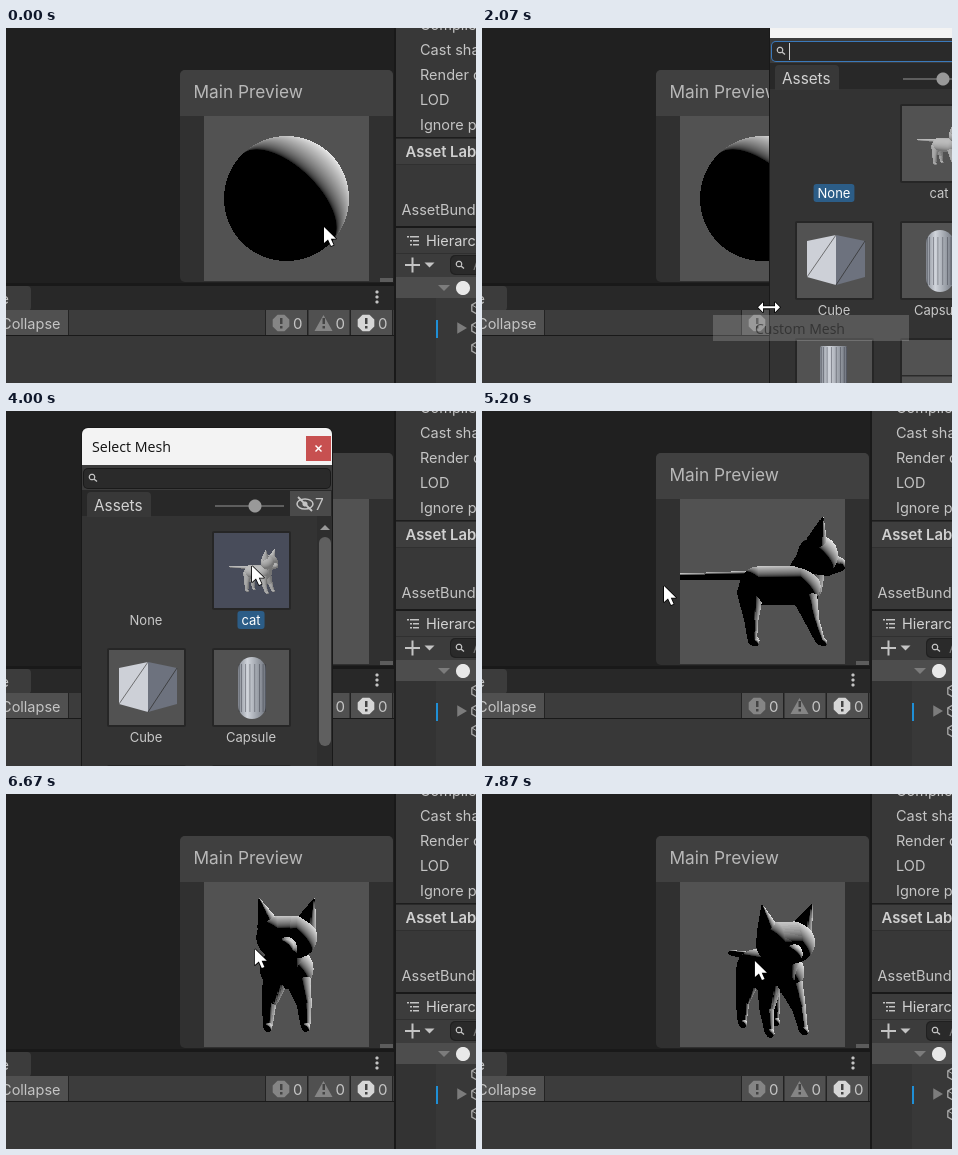
An HTML page with a canvas for the animation above (8 s loop, 470 by 355 pixels).

```html
<!DOCTYPE html>
<html lang="en">
<head>
<meta charset="utf-8">
<title>Preview mesh</title>
<style>
  html, body { margin: 0; height: 100%; overflow: hidden; background: #202020; }
  canvas { display: block; }
</style>
</head>
<body>
<canvas id="stage" width="470" height="355"></canvas>
<script>
const ctx = document.getElementById('stage').getContext('2d');
const LOOP = 8000, STEP = 1000 / 15;
const UI = 'Inter, sans-serif', SYSTEM = '"Open Sans", sans-serif';
const TEXT = '#c4c4c4', TOOLBAR = '#3c3c3c', LINE = '#232323', THUMB = '#525252';
const MENU = ['Sphere', 'Capsule', 'Cylinder', 'Cube', 'Quad', 'Sprite', 'Custom Mesh'];

// Moves: start, end, then where the values arrive.
const pointerAt = follow([318, 199], [
  [0, 470, 228, 128], [730, 1400, 288, 293], [1870, 2070, 287, 279], [2070, 2600, 390, 4],
  [3200, 3670, 178, 48], [3670, 3930, 246, 155], [4200, 4470, 290, 193],
  [4600, 5200, 182, 175], [5530, 6670, 249, 155], [6670, 7870, 273, 167]
]);
const dialogAt = follow([288, -27], [[3200, 3670, 76, 17]]);
const viewAt = follow([Math.PI, 0], [ // yaw, pitch
  [4600, 5200, Math.PI / 2, 0], [5530, 6670, 0, 0], [6670, 7400, 0.7, -0.06], [7400, 7870, 0.41, 0.1]
]);

function follow(start, moves) {
  return t => moves.reduce((from, [begin, end, ...to]) => {
    const f = Math.min(1, Math.max(0, (t - begin) / (end - begin)));
    return from.map((v, i) => v + (to[i] - v) * f);
  }, start);
}

// Meshes are chains of [x, y, z, radius]; z points towards the viewer.
const leg = (side, z, lean) => [
  [side * 10, -11, z, 13], [side * 17, -38, z + lean, 7],
  [side * 18, -58, z + lean * 2, 4.5], [side * 18, -60, z + lean * 2 + 3, 4]
];
const SPHERE = [[[0, 0, 0, 62.5], [0, 0, 0, 62.5]]];
const CAT = [
  [[0, 5, -83, 3], [0, 6, -18, 4.5]],
  [[0, -4, 40, 20], [0, 14, 46, 17]],
  [[-9, 26, 55, 20], [9, 26, 55, 20]],
  [[0, 18, 62, 13], [0, 17, 77, 7]],
  ...[-1, 1].flatMap(side => [
    [[side * 6, -4, -4, 19], [side * 6, -4, 38, 20]],
    [[side * 17, 36, 53, 11], [side * 26, 62, 59, 1]],
    leg(side, -12, 1),
    leg(side, 41, 8)
  ])
];

function renderMesh(chains, { yaw = 0, pitch = 0, size = 165, scale = 1, light = [0.6, 0.62, -0.5], ambient = 0 }) {
  const canvas = document.createElement('canvas');
  canvas.width = canvas.height = size;
  const c = canvas.getContext('2d'), img = c.createImageData(size, size);
  const depth = new Float32Array(size * size).fill(-1e6);
  const sy = Math.sin(yaw), cy = Math.cos(yaw), sp = Math.sin(pitch), cp = Math.cos(pitch);

  function ball([x, y, z, r]) {
    const turned = z * cy - x * sy, near = y * sp + turned * cp;
    const k = scale * 1200 / (1200 - near), R = r * k;
    const px = size / 2 + (x * cy + z * sy) * k, py = size / 2 - (y * cp - turned * sp) * k;
    for (let j = Math.max(0, Math.floor(py - R)); j < Math.min(size, py + R); j++) {
      for (let i = Math.max(0, Math.floor(px - R)); i < Math.min(size, px + R); i++) {
        const nx = (i + 0.5 - px) / R, ny = (py - j - 0.5) / R, s = nx * nx + ny * ny;
        if (s >= 1) continue;
        const nz = Math.sqrt(1 - s), d = near + r * nz, n = j * size + i;
        if (d <= depth[n]) continue;
        depth[n] = d;
        const lit = Math.max(0, nx * light[0] + ny * light[1] + nz * light[2]);
        img.data.fill(255 * (lit + ambient) ** 0.4545, n * 4, n * 4 + 3);
        img.data[n * 4 + 3] = 255;
      }
    }
  }

  for (const chain of chains) {
    for (let i = 1; i < chain.length; i++) {
      const a = chain[i - 1], b = chain[i];
      const steps = Math.ceil(Math.hypot(b[0] - a[0], b[1] - a[1], b[2] - a[2])) || 1;
      for (let n = 0; n <= steps; n++) ball(a.map((v, m) => v + (b[m] - v) * n / steps));
    }
  }
  c.putImageData(img, 0, 0);
  return canvas;
}

const sphereView = renderMesh(SPHERE, {});
const catThumb = renderMesh(CAT, { yaw: 1, pitch: 0.12, size: 74, scale: 0.34, light: [-0.15, 0.22, 0.2], ambient: 0.18 });

function rect(x, y, w, h, fill, radius = 0) {
  ctx.fillStyle = fill;
  ctx.beginPath();
  ctx.roundRect(x, y, w, h, radius);
  ctx.fill();
}
function text(str, x, y, { size = 14.5, color = TEXT, family = UI, align = 'left', weight = 400 } = {}) {
  ctx.font = `${weight} ${size}px ${family}`;
  ctx.fillStyle = color;
  ctx.textAlign = align;
  ctx.fillText(str, x, y);
}
function poly(points, fill, stroke, width = 1) {
  ctx.beginPath();
  points.forEach(([x, y]) => ctx.lineTo(x, y));
  if (fill) { ctx.closePath(); ctx.fillStyle = fill; ctx.fill(); }
  if (stroke) { ctx.strokeStyle = stroke; ctx.lineWidth = width; ctx.stroke(); }
}
// Regular polygon of n corners.
const ngon = (x, y, r, n, start = 0) => Array.from({ length: n + 1 }, (_, i) => {
  const a = start + i * 2 * Math.PI / n;
  return [x + r * Math.cos(a), y + r * Math.sin(a)];
});
const dot = (x, y, r, fill, stroke, width) => poly(ngon(x, y, r, 40), fill, stroke, width);
const down = (x, y, s, color) => poly([[x - s, y - s / 2], [x + s, y - s / 2], [x, y + s / 2]], color);

function lens(x, y) {
  dot(x - 1, y - 1, 2.7, null, TEXT, 1.2);
  poly([[x + 1, y + 1], [x + 4, y + 3.5]], null, TEXT, 1.4);
}
function boxIcon(x, y) {
  poly(ngon(x, y, 6, 6, Math.PI / 6), null, '#aaa', 1.3);
  poly([[x - 5, y - 3], [x, y], [x + 5, y - 3]], null, '#aaa');
}

function drawPreview(t) {
  rect(174, 42, 213, 212, '#303030', 5);
  rect(174, 42, 213, 46, '#404040', [5, 5, 0, 0]);
  text('Main Preview', 187.5, 70, { size: 17.3, color: '#b8b8b8' });
  rect(198, 88, 165, 165, THUMB);
  rect(374, 250, 13, 4, '#5c5c5c');
  if (t < 3900) ctx.drawImage(sphereView, 198, 88);
  else {
    const [yaw, pitch] = viewAt(t);
    ctx.drawImage(renderMesh(CAT, { yaw, pitch, light: [0.6, 0.62, -0.3] }), 198, 88);
  }
}

function drawConsole() {
  rect(0, 255, 388, 100, '#191919');
  rect(0, 258, 388, 24, '#282828');
  rect(-8, 258, 33, 25, TOOLBAR, 4);
  text('Console', 3, 276, { align: 'right' });
  for (let i = -1; i <= 1; i++) dot(371, 269 + i * 5, 1.6, TEXT);
  rect(0, 282, 388, 25, TOOLBAR);
  rect(0, 282, 62, 25, '#505050');
  rect(62, 282, 1, 25, LINE);
  text('Collapse', 54.5, 301, { align: 'right' });
  for (let i = 0; i < 3; i++) {
    const x = 260 + i * 42.5, color = i === 2 ? '#d6d6d6' : '#858585';
    rect(x - 1, 282, 43, 25, LINE);
    rect(x, 282, 41, 25, '#505050');
    if (i === 1) poly([[x + 15, 287], [x + 24, 303], [x + 6, 303]], color);
    else poly(ngon(x + 15, 295, 9, 8, Math.PI / 8), color);
    rect(x + 14, 290, 2.5, 6, '#444');
    rect(x + 14, 298, 2.5, 2.5, '#444');
    text('0', x + 27, 301, { size: 15 });
  }
  rect(0, 308, 388, 47, '#383838');
}

function drawInspector() {
  rect(388, 0, 82, 355, '#191919');
  rect(390, 0, 80, 198, '#383838');
  ['Compile and show', 'Cast shadows', 'Render queue', 'LOD', 'Ignore projector']
    .forEach((label, i) => text(label, 414, 2 + i * 25));
  rect(390, 109, 80, 1.5, '#1d1d1d');
  rect(390, 111, 80, 25, '#3e3e3e');
  rect(390, 136, 80, 1, '#303030');
  text('Asset Labels', 399.5, 129, { size: 14.8, color: '#d0d0d0', weight: 600 });
  text('AssetBundle', 395.5, 187);
}

function drawHierarchy() {
  rect(390, 200, 80, 155, '#383838');
  rect(390, 200, 80, 49, TOOLBAR);
  rect(390, 225, 80, 1, '#303030');
  for (let i = 0; i < 3; i++) {
    rect(i ? 404 : 401, 208 + i * 4, 2, 1.5, TEXT);
    rect(i ? 407 : 404, 208 + i * 4, i ? 6 : 9, 1.5, TEXT);
  }
  text('Hierarchy', 420, 218, { color: '#d2d2d2' });
  rect(399, 236, 15, 2, TEXT);
  rect(405.5, 229.5, 2, 15, TEXT);
  down(423.5, 237, 5, TEXT);
  rect(444, 227, 40, 20, '#202020', 5);
  rect(445, 228, 40, 18, '#2a2a2a', 5);
  lens(454, 237);
  text('All', 467, 242, { size: 13, color: '#777' });
  rect(390, 249, 80, 21, '#4d4d4d');
  rect(390, 270, 40, 85, '#333');
  down(438, 260, 6, '#7c7c7c');
  dot(457, 260, 7, '#e8e8e8');
  rect(430, 292, 2, 18, '#1f8fd6');
  poly(ngon(454.5, 300, 6.5, 3), '#7c7c7c');
  for (let y = 280; y <= 320; y += 20) boxIcon(471, y);
}

function drawMenu(t, pointerY) {
  if (t < 660 || t > 2130) return;
  ctx.save();
  if (t < 1860) {
    ctx.globalAlpha = Math.min(1, (t - 600) / 130);
    ctx.shadowColor = 'rgba(0,0,0,.5)';
    ctx.shadowBlur = 5;
    rect(228, 128, 202, 188, '#f9f9f9', 5);
    ctx.shadowBlur = 0;
    const hover = Math.floor((pointerY - 131) / 26);
    if (hover >= 0) rect(235, 131 + hover * 26, 188, 26, '#f0f0f0', 4);
    MENU.forEach((item, i) => text(item, 273, 150 + i * 26, { size: 14, color: '#111', family: SYSTEM }));
  } else {
    const fade = 1 - (t - 1800) / 330;
    ctx.globalAlpha = fade;
    rect(231, 287, 196, 26, '#f0f0f0');
    ctx.globalAlpha = Math.min(1, fade * 3);
    text(MENU[6], 273, 306, { size: 14, color: '#1a1a1a', family: SYSTEM });
  }
  ctx.restore();
}

function solid(x, y, w, h, radius) {
  const shade = ctx.createLinearGradient(x, 0, x + w, 0);
  ['#878c95', '#d0d4db', '#a0a5ad', '#70757f'].forEach((color, i) => shade.addColorStop(i / 3, color));
  rect(x, y, w, h, shade, radius);
  for (let i = 1; i < 9; i++) {
    const lineX = x + w / 2 - Math.cos(i / 9 * Math.PI) * w / 2;
    rect(lineX, y + radius / 2, 0.7, h - radius, 'rgba(40,44,52,.55)');
  }
}

function thumb(name, col, row, selected, paint) {
  const x = 27 + col * 105, y = 105 + row * 117;
  if (paint) {
    rect(x - 2, y - 2, 79, 79, '#262626', 2);
    rect(x, y, 75, 75, selected ? '#484c5a' : THUMB);
    paint(x, y);
  }
  ctx.font = `13px ${UI}`;
  const w = ctx.measureText(name).width + 8;
  if (selected) rect(x + 37 - w / 2, y + 78, w, 18, '#2c5d87', 3);
  text(name, x + 37, y + 92, { size: 13, color: selected ? '#fff' : '#c8c8c8', align: 'center' });
}

function paintCube(x, y) {
  const side = (dir, color) => poly([[39, 12], [39 + dir * 29, 18], [39 + dir * 29, 54], [39, 62]]
    .map(([px, py]) => [x + px, y + py]), color);
  side(-1, '#cdd0d7');
  side(1, '#6d727e');
  poly([[x + 10, y + 54], [x + 39, y + 12]], null, '#555', 0.8);
  poly([[x + 39, y + 62], [x + 68, y + 18]], null, '#333', 0.8);
}

function drawDialog(t) {
  if (t < 1930 || t > 4120) return;
  const [x, y] = dialogAt(t), focused = t < 3200, catChosen = t > 3900;
  ctx.save();
  ctx.translate(Math.round(x), Math.round(y));
  rect(-1, -1, 252, 420, '#191919', 7);
  rect(0, 0, 250, 400, '#333', [6, 6, 0, 0]);
  rect(0, 0, 250, 37, '#f3f3f3', [6, 6, 0, 0]);
  text('Select Mesh', 10, 24, { size: 14.2, color: '#111', family: SYSTEM });
  rect(224, 8, 25, 25, '#c75050');
  for (const s of [-3, 3]) poly([[236.5 - s, 17.5], [236.5 + s, 23.5]], null, '#fff', 1.4);

  rect(0, 37, 250, 51, TOOLBAR);
  rect(1, 40, 248, 21, focused ? '#3a79bb' : '#1a1a1a', 5);
  rect(2, 41, 246, 19, '#2a2a2a', 4);
  lens(11, 50);
  if (focused) rect(19, 42, 1, 17, '#d0d0d0');
  rect(0, 62, 250, 26, '#282828');
  rect(5, 64, 64, 25, '#383838', [4, 4, 0, 0]);
  text('Assets', 12, 83, { size: 15.3, color: '#d2d2d2' });
  rect(133, 77, 69, 2, '#5e5e5e');
  dot(173, 78, 6.5, '#999');
  rect(208, 63, 41, 25, '#4a4a4a');
  ctx.beginPath();
  ctx.ellipse(223, 76, 8, 5, 0, 0, 7);
  ctx.strokeStyle = TEXT;
  ctx.lineWidth = 1.5;
  ctx.stroke();
  dot(223, 76, 2.5, TEXT);
  poly([[216, 69], [230, 83]], null, TEXT, 1.8);
  text('7', 233, 82, { size: 15.5 });

  rect(235, 88, 15, 312, '#2e2e2e');
  down(243, 99.5, -5, '#999');
  rect(237, 109, 12, 209, '#5f5f5f', 6);

  thumb('None', 0, 0, !catChosen);
  thumb('cat', 1, 0, catChosen, (x, y) => ctx.drawImage(catThumb, x + 2, y));
  thumb('Cube', 0, 1, false, paintCube);
  thumb('Capsule', 1, 1, false, (x, y) => solid(x + 24, y + 7, 28, 62, 14));
  thumb('Cylinder', 0, 2, false, (x, y) => solid(x + 23, y + 6, 27, 60, 2));
  thumb('Plane', 1, 2, false, (x, y) => rect(x, y + 35, 75, 1.5, '#2a2a2a'));
  ctx.restore();
}

function drawPointer(t, x, y) {
  ctx.save();
  ctx.translate(x, y);
  ctx.lineJoin = 'round';
  const resizing = t > 1990 && t < 2130;
  const shape = resizing
    ? [1, -1].flatMap(s => [[-11, 0], [-6, -5], [-6, -1], [6, -1], [6, -5], [11, 0]].map(([px, py]) => [px * s, py * s]))
    : [[0, 0], [0, 16], [4, 12.5], [7, 19], [9.6, 18], [6.8, 11.8], [12, 11.8], [0, 0]];
  poly(shape, null, '#000', 1.6);
  poly(shape, '#fff');
  ctx.restore();
}

function draw(t) {
  const [x, y] = pointerAt(t);
  rect(0, 0, 470, 355, '#202020');
  drawPreview(t);
  drawConsole();
  drawInspector();
  drawHierarchy();
  drawDialog(t);
  drawMenu(t, y);
  drawPointer(t, x, y);
}

let last = -1;
function tick() {
  const step = Math.floor((performance.now() % LOOP + 4) / STEP) % 120;
  if (step !== last) draw(step * STEP);
  last = step;
  requestAnimationFrame(tick);
}
tick();
</script>
</body>
</html>
```
